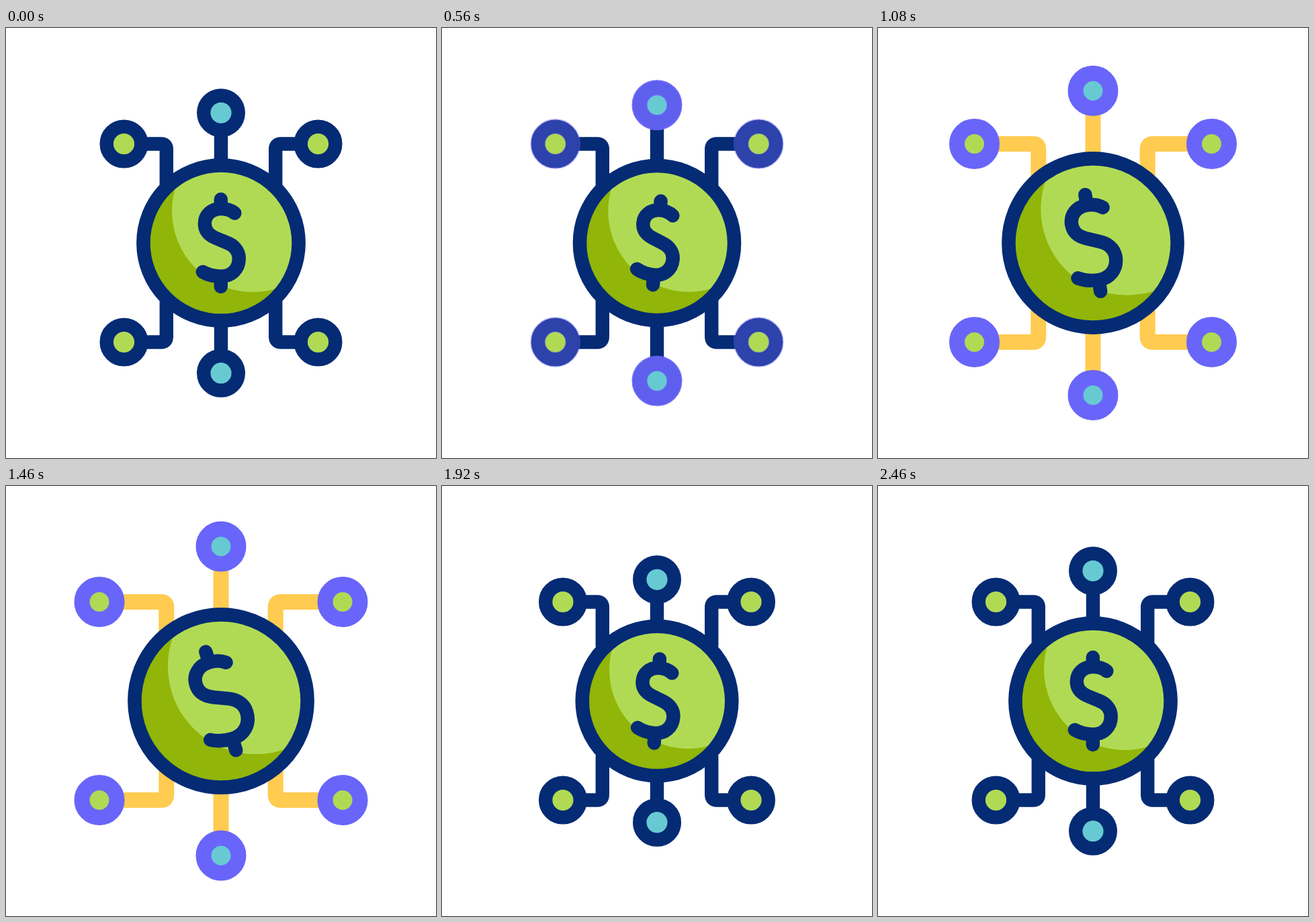
Recreate the animation shown at these times as an HTML page. Size 640x640 px, loop 3.2 s.

```html
<!DOCTYPE html>
<html lang="en">
<head>
<meta charset="utf-8">
<title>Money network</title>
<style>
  html, body { margin: 0; width: 100%; height: 100%; overflow: hidden; background: #fff; }
  svg { display: block; width: 100%; height: 100%; }
</style>
</head>
<body>
<svg id="stage" viewBox="0 0 640 640" fill="none" stroke-linecap="round" stroke-linejoin="round">
  <defs><clipPath id="face"><circle id="faceClip" cx="320" cy="320"/></clipPath></defs>
  <g id="links"></g>
  <g id="coin">
    <circle id="shade" cx="320" cy="320" fill="#91b508"/>
    <g clip-path="url(#face)"><circle id="shine" fill="#b1da54"/></g>
    <circle id="rim" cx="320" cy="320" stroke="#042b74" stroke-width="20.6"/>
    <path id="dollar" stroke="#042b74" d="M20.5-44.5C15-49 8-51 0-51C-14-51-24-41.500-24-29C-24-16.500-16-11-8-7.500L9-.5C18 3 27 10.500 27 23C27 39.500 15 49.700 0 49.700C-11 49.700-19 47.500-27 43M0-65V-51M0 65V50"/>
  </g>
  <g id="nodes"></g>
</svg>
<script>
const LOOP = 3200, NAVY = '#042b74', PURPLE = '#6965fa', YELLOW = '#ffcb50';
const $ = id => document.getElementById(id);

function add(parent, tag, attrs) {
  const el = document.createElementNS('http://www.w3.org/2000/svg', tag);
  set(el, attrs);
  return parent.appendChild(el);
}
function set(el, attrs) {
  for (const k in attrs) el.setAttribute(k, attrs[k]);
}
const clamp = x => Math.max(0, Math.min(1, x));
const ramp = (t, a, b) => clamp((t - a) / (b - a));

// Smooth curve through [time, value] points, without overshoot between them
function track(pts) {
  const n = pts.length - 1;
  const grad = i => (pts[i + 1][1] - pts[i][1]) / (pts[i + 1][0] - pts[i][0]);
  const slope = pts.map((p, i) => {
    if (i === 0 || i === n) return 0;
    const a = grad(i - 1), b = grad(i);
    return a * b > 0 ? 2 * a * b / (a + b) : 0;
  });
  return t => {
    if (t <= pts[0][0]) return pts[0][1];
    if (t >= pts[n][0]) return pts[n][1];
    let i = 0;
    while (t > pts[i + 1][0]) i++;
    const [t0, v0] = pts[i], [t1, v1] = pts[i + 1];
    const h = t1 - t0, u = (t - t0) / h, w = 1 - u;
    return v0 * w * w * (1 + 2 * u) + v1 * u * u * (1 + 2 * w)
         + h * u * w * (slope[i] * w - slope[i + 1] * u);
  };
}

// Each part moves out on its own curve, then springs back with its own delay
const settle = track([[1650, 1], [1670, .99], [1720, .85], [1760, .46],
  [1890, -.36], [2030, .04], [2130, .27], [2370, 0]]);
function motion(delay, pts) {
  const out = track(pts);
  return t => out(t) * settle(t - delay);
}
const coinGrow = motion(0, [[0, 0], [340, -5.5], [760, 5.5], [1080, 10], [1460, 13], [1660, 13.4]]);
const poleMove = motion(40, [[0, 0], [320, -12.5], [340, -12.2], [540, 10], [760, 23.8],
  [1080, 32.8], [1460, 36.3], [1660, 36.8]]);
const sideMove = motion(90, [[0, 0], [340, -13.5], [540, 5], [760, 22], [1080, 32],
  [1460, 36.5], [1660, 37.5]]);
const signGrow = motion(80, [[0, 0], [340, -.1], [760, .043], [1080, .12], [1460, .18], [1680, .187]]);
const signTurn = motion(80, [[0, 0], [340, 8], [760, .85], [1080, -9], [1460, -17], [1740, -20]]);

function makeArm(sx, sy) {
  const side = sx !== 0;
  const base = add($('links'), 'path', { stroke: NAVY, 'stroke-width': 20.4 });
  const flow = add($('links'), 'path', { stroke: YELLOW, 'stroke-width': 23, pathLength: 1 });
  const node = add($('nodes'), 'g', {});
  add(node, 'circle', { r: 26, fill: side ? '#b1da54' : '#67cad2' });
  add(node, 'circle', { r: 25.8, stroke: NAVY, 'stroke-width': 20.4 });
  const glow = add(node, 'circle', { r: 26, stroke: PURPLE, 'stroke-width': 23 });
  return { sx, sy, side, base, flow, node, glow };
}
const arms = [[-1, -1], [0, -1], [1, -1], [-1, 1], [0, 1], [1, 1]].map(a => makeArm(...a));

function drawArm({ sx, sy, side, base, flow, node, glow }, t) {
  let x, y, d;
  if (side) {
    x = 320 + sx * (144.5 + sideMove(t));
    y = 320 + sy * 147.5;
    const bend = 320 + sx * 81.2;
    d = `M${bend} ${320 + sy * 82}V${y - sy * 8}Q${bend} ${y} ${bend + sx * 8} ${y}H${x}`;
  } else {
    x = 320;
    y = 320 + sy * (193.7 + poleMove(t));
    d = `M320 ${320 + sy * 108}V${y}`;
  }
  const head = ramp(t, 738, 1090), tail = ramp(t, 1700, 1960);
  base.setAttribute('d', d);
  set(flow, {
    d,
    'stroke-dasharray': `${Math.max(head - tail, .0001)} 2`,
    'stroke-dashoffset': -tail,
    visibility: head > tail ? 'visible' : 'hidden'
  });
  node.setAttribute('transform', `translate(${x} ${y})`);
  const lag = side ? 50 : 0;
  glow.setAttribute('opacity', ramp(t, 470 + lag, 570 + lag) * (1 - ramp(t, 1668 + lag, 1750 + lag)));
}

function draw(t) {
  arms.forEach(a => drawArm(a, t));
  const r = 115.6 + coinGrow(t);
  const lit = 1 + .75 * (r / 115.6 - 1);
  for (const id of ['shade', 'faceClip', 'rim']) $(id).setAttribute('r', r);
  set($('shine'), { cx: 320 + 47.5 * lit, cy: 320 - 47.5 * lit, r: 120.5 * lit });
  const size = 1 + signGrow(t);
  set($('dollar'), {
    transform: `translate(319.800 320) rotate(${signTurn(t)}) scale(${size})`,
    'stroke-width': 20.4 / size
  });
}

const start = performance.now();
function tick() {
  draw((performance.now() - start) % LOOP);
  requestAnimationFrame(tick);
}
tick();
</script>
</body>
</html>
```
